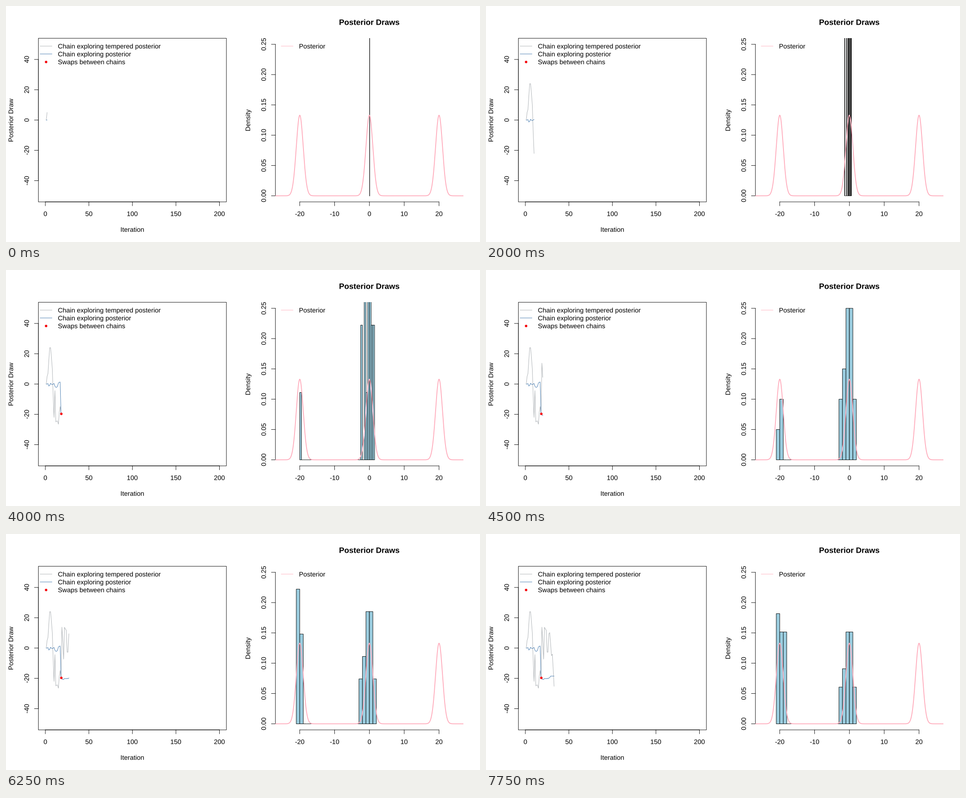
These frames come from a looping animation (1058x529 px, 8000 ms). A matplotlib script:

```python
import numpy as np
import matplotlib.pyplot as plt
from matplotlib.animation import FuncAnimation
from matplotlib.collections import PolyCollection
from matplotlib.patches import PathPatch, Rectangle
from matplotlib.textpath import TextPath
from matplotlib.transforms import Affine2D

WIDTH, HEIGHT, DPI = 1058, 529, 100
PX = 72 / DPI                      # points per pixel
INCH = WIDTH / 12                  # the plot is laid out on a 12 x 6 inch page
LINE = 0.2 * INCH                  # height of one margin line
FONT = INCH / 6                    # 12 pt type
STROKE = INCH / 96
TOP, BOTTOM = 4.1 * LINE, HEIGHT - 5.1 * LINE
PANEL_W = WIDTH / 2 - 6.2 * LINE
LEFT_X, RIGHT_X = 4.1 * LINE, WIDTH / 2 + 4.1 * LINE

GREY, BLUE, RED = "#a9aeb2", "#4178ae", "#f5060c"
PINK, FILL = "#ffacbc", "#9bcddf"

TEMPERED = np.array([
    0, 5, 7, 16, 24, 24, 17.5, 10, -8, -22, -4.3, -24.9, -24.5, -24.4, -26.5,
    -18.5, -14.8, -19.6, 13.8, 4.5, -7.3, 13.7, 12.6, 11.8, -2.7, -2.7, 9.4,
    10.2, 3, -5, -4, -14, -25.2])
POSTERIOR = np.array([
    0, 0, .32, -1.32, -.77, .52, -.1, -.35, .05, .38, -1.45, -2.12, -2.15,
    -1.38, .7, 1.15, 1.35, -19.6, -19.9, -20.85, -20.7, -20.1, -20.05, -20.3,
    -19.9, -20.3, -19.7, -19.55, -18.5, -18.5, -18.5, -18.5, -18.5])
SWAP = 18

plt.rcParams["path.snap"] = False

fig = plt.figure(figsize=(WIDTH / DPI, HEIGHT / DPI), dpi=DPI, facecolor="white")
ax = fig.add_axes([0, 0, 1, 1])
ax.set(xlim=(0, WIDTH), ylim=(HEIGHT, 0))
ax.axis("off")


def scale(low, high, start, end):
    """Map data to pixels, with 4 % padding beyond both limits."""
    pad = 0.04 * (high - low)
    return lambda v: start + (np.asarray(v) - low + pad) / (high - low + 2 * pad) * (end - start)


iter_x = scale(0, 200, LEFT_X, LEFT_X + PANEL_W)
draw_y = scale(-50, 50, BOTTOM, TOP)
value_x = scale(-25, 25, RIGHT_X, RIGHT_X + PANEL_W)
dens_y = scale(0, 0.25, BOTTOM, TOP)


def line(x, y, color="black", width=STROKE, **kw):
    return ax.plot(x, y, color=color, lw=width * PX, **kw)[0]


def dot(x, y):
    return ax.plot([x], [y], "o", color=RED, ms=5.6 * PX, mew=0, zorder=4)[0]


def label(x, y, text, size=FONT, align=0.5, angle=0, weight="normal"):
    """Outline text at its natural width, anchored on the baseline."""
    path = TextPath((0, 0), text, size=size,
                    prop={"family": "Liberation Sans", "weight": weight})
    box = path.get_extents()
    place = (Affine2D().translate(-box.x0 - align * box.width, 0) if align
             else Affine2D())
    place.scale(1, -1).rotate_deg(-angle).translate(x, y)
    ax.add_patch(PathPatch(place.transform_path(path), fc="black", lw=0))


def x_axis(to_px, ticks):
    line(to_px([ticks[0], ticks[-1]]), [BOTTOM] * 2)
    for t in ticks:
        line([to_px(t)] * 2, [BOTTOM, BOTTOM + LINE / 2])
        label(to_px(t), BOTTOM + 1.8 * LINE, f"{t}")


def y_axis(to_px, ticks, left, fmt, title):
    line([left] * 2, to_px([ticks[0], ticks[-1]]))
    for t in ticks:
        line([left - LINE / 2, left], [to_px(t)] * 2)
        label(left - 1.2 * LINE, to_px(t), format(t, fmt), angle=90)
    label(left - 3.2 * LINE, (TOP + BOTTOM) / 2, title, angle=90)


def legend_row(x, row, text, color=None):
    y = TOP + row * LINE
    if color:
        line([x, x + 26.4], [y, y], color)
    else:
        dot(x + 13.2, y)
    label(x + 39.6, y + 5.3, text, align=0)


# Left panel
ax.add_patch(Rectangle((LEFT_X, TOP), PANEL_W, BOTTOM - TOP, fill=False, lw=STROKE * PX))
x_axis(iter_x, range(0, 201, 50))
y_axis(draw_y, range(-40, 41, 20), LEFT_X, "d", "Posterior Draw")
label(LEFT_X + PANEL_W / 2, BOTTOM + 3.8 * LINE, "Iteration")
legend_row(76.2, 1, "Chain exploring tempered posterior", GREY)
legend_row(76.2, 2, "Chain exploring posterior", BLUE)
legend_row(76.2, 3, "Swaps between chains")

# Right panel
x_axis(value_x, range(-20, 21, 10))
y_axis(dens_y, np.arange(6) * 0.05, RIGHT_X, ".2f", "Density")
label(RIGHT_X + PANEL_W / 2, 42.4, "Posterior Draws", 1.2 * FONT, weight="bold")
legend_row(614.3, 1, "Posterior", PINK)

grid = np.linspace(-27, 27, 1081)
density = sum(np.exp(-(grid - m) ** 2 / 2) for m in (-20, 0, 20)) / (3 * np.sqrt(2 * np.pi))
line(value_x(grid), dens_y(density), PINK, 2 * STROKE, zorder=3, solid_capstyle="butt")

bars = PolyCollection([], facecolors=FILL, edgecolors="black",
                      linewidths=STROKE * PX, zorder=2)
ax.add_collection(bars)
bars.set_clip_path(Rectangle((RIGHT_X, TOP), PANEL_W, BOTTOM - TOP, transform=ax.transData))

tempered_line = line([], [], GREY, zorder=2)
posterior_line = line([], [], BLUE, zorder=3)
swap_dot = dot(iter_x(SWAP), draw_y(POSTERIOR[SWAP - 1]))


def bin_width(spread, cells=30):
    """Round the ideal cell to 1, 2, 5 or 10 times a power of ten."""
    if spread == 0:
        return 0.01
    cell = spread / cells
    base = 10 ** np.floor(np.log10(cell))
    unit = base
    for factor, bias in ((2, 1.5), (5, 2.75), (10, 1.5)):
        if factor * base - cell >= bias * (cell - unit):
            break
        unit = factor * base
    return unit


def histogram(values):
    """Rectangles of a density histogram with right-closed bins."""
    unit = bin_width(np.ptp(values))
    first = int(np.floor(values.min() / unit + 1e-7))
    last = max(int(np.ceil(values.max() / unit - 1e-7)), first + 1)
    cells = np.maximum(np.ceil(values / unit - 1e-7).astype(int) - 1, first)
    counts = np.bincount(cells - first, minlength=last - first)
    base = dens_y(0)
    rects = []
    for i, count in enumerate(counts):
        x0, x1 = value_x([(first + i) * unit, (first + i + 1) * unit])
        top = max(dens_y(count / (len(values) * unit)), -50)
        rects.append([(x0, base), (x0, top), (x1, top), (x1, base)])
    return rects


def update(frame):
    n = frame + 2
    x = iter_x(np.arange(1, n + 1))
    tempered_line.set_data(x, draw_y(TEMPERED[:n]))
    posterior_line.set_data(x, draw_y(POSTERIOR[:n]))
    swap_dot.set_visible(n >= SWAP)
    bars.set_verts(histogram(POSTERIOR[:n]))
    return tempered_line, posterior_line, swap_dot, bars


anim = FuncAnimation(fig, update, frames=32, interval=250, repeat=True,
                     repeat_delay=0, blit=False)
plt.show()
```
